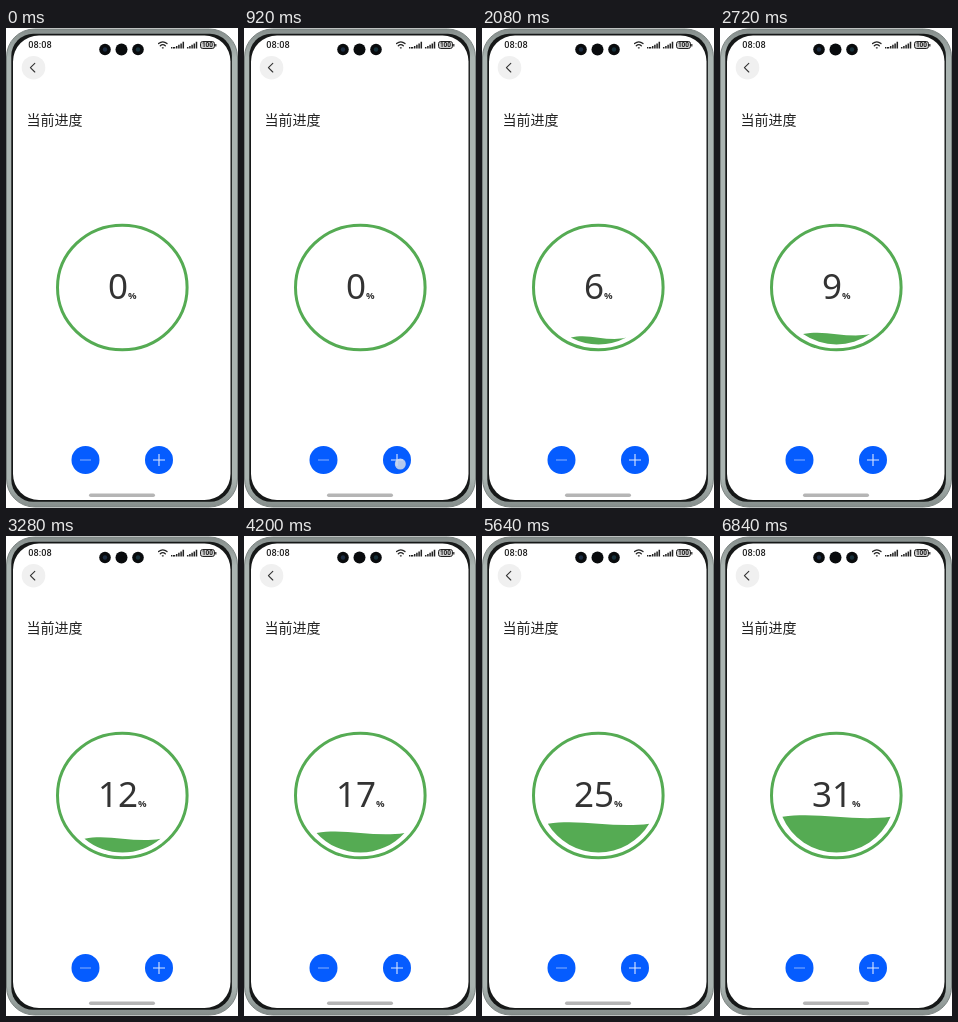
An HTML page that plays this animation: 232x480 px, repeating every 7000 ms.

```html
<!DOCTYPE html>
<html lang="zh">
<head>
<meta charset="utf-8">
<title>当前进度</title>
<style>
  html, body { margin: 0; width: 100%; height: 100%; overflow: hidden; background: #fff; }
  svg { display: block; width: 232px; height: 480px; }
  text { font-family: "Noto Sans", "Open Sans", sans-serif; }
  .title { font: 500 14px "Noto Sans CJK SC", "Noto Sans CJK", sans-serif; fill: #222; }
  .clock { font: 500 9.2px Roboto, sans-serif; fill: #222; }
  .battery { font: 700 6.5px Roboto, sans-serif; fill: #222; }
  .number { font-size: 35px; font-weight: 500; fill: #333; }
  .percent { font-size: 9.5px; font-weight: 600; }
  .line { fill: none; stroke-linecap: round; stroke-linejoin: round; }
</style>
</head>
<body>
<svg viewBox="0 0 232 480">
  <defs>
    <linearGradient id="metal" x2="0" y2="1">
      <stop offset="0" stop-color="#858d8b"/>
      <stop offset=".06" stop-color="#aab4b1"/>
      <stop offset=".94" stop-color="#aab4b1"/>
      <stop offset="1" stop-color="#858d8b"/>
    </linearGradient>
    <filter id="soft"><feGaussianBlur stdDeviation=".6"/></filter>
    <path id="bars" d="M.5 20.4V19M2.7 20.4V18M4.9 20.4V16.8M7.1 20.4V15.4M9.3 20.4V13.8" stroke="#222" stroke-width="1.5"/>
  </defs>

  <!-- phone body -->
  <rect x=".5" y="1" width="231" height="478" rx="28" fill="url(#metal)" stroke="#7b8381"/>
  <rect x="5.3" y="5.8" width="220.6" height="468" rx="22" fill="#161818" filter="url(#soft)"/>
  <rect x="7" y="7.5" width="217.5" height="464.5" rx="26" fill="#fff"/>

  <!-- status bar -->
  <text class="clock" x="22.3" y="20.3">08:08</text>
  <g fill="#090b0d">
    <circle cx="99" cy="21.5" r="5.8"/>
    <circle cx="115.5" cy="21.5" r="6"/>
    <circle cx="132" cy="21.5" r="5.8"/>
  </g>
  <circle cx="99" cy="21.5" r="2.2" fill="#1c2c40"/>
  <circle cx="132" cy="21.5" r="2.2" fill="#17303a"/>
  <g class="line" stroke="#222" stroke-width="1.3">
    <path d="M152.6 15.6Q156.8 12 161 15.6M154.3 17.7Q156.8 15.5 159.3 17.7"/>
    <path d="M156.4 19.8H157.2"/>
  </g>
  <path d="M165 19.7H168" stroke="#222" stroke-width="1.4" stroke-dasharray="1.2 .6"/>
  <use href="#bars" x="168"/>
  <use href="#bars" x="181.2"/>
  <rect x="194.5" y="13.5" width="14" height="7" rx="2.2" fill="#ccc" stroke="#222"/>
  <path d="M209.8 16V18.5" stroke="#222" stroke-width="1.2"/>
  <text class="battery" x="201.5" y="19.4" text-anchor="middle">100</text>

  <!-- header -->
  <circle cx="27.5" cy="39.7" r="11.8" fill="#f0f0f0"/>
  <path class="line" d="M28.8 35.4L24.4 39.7L28.8 44" stroke="#333" stroke-width="1.1"/>
  <text class="title" x="20.5" y="97.3">当前进度</text>

  <!-- gauge -->
  <ellipse cx="116.3" cy="259.5" rx="64.8" ry="62.3" fill="none" stroke="#55ab53" stroke-width="3"/>
  <path id="water" fill="#55ab53"/>
  <text class="number" x="116.2" y="271.2" text-anchor="middle"><tspan id="count">0</tspan><tspan class="percent">%</tspan></text>

  <!-- buttons -->
  <g fill="#055cff">
    <circle cx="79.5" cy="432" r="14"/>
    <circle cx="153" cy="432" r="14"/>
  </g>
  <path d="M74 432H85" stroke="#8ab0fc"/>
  <path d="M147 432H159M153 426V438" stroke="#dce7ff" stroke-width="1.1"/>
  <circle id="touch" cx="156.3" cy="436" r="5.5" fill="#d4dcec" fill-opacity=".85" visibility="hidden"/>
  <rect x="83" y="465.6" width="66" height="3.4" rx="1.7" fill="#b5b5b5"/>
</svg>
<script>
  const LOOP = 7000, PRESS = 80;
  // [count, time of that tap]; taps between are evenly spaced
  const PACE = [[1, 1000], [6, 2070], [7, 2280], [13, 3395], [18, 4400], [26, 5760], [31, 6680]];
  const CX = 116.5, CY = 258.8, RX = 58.5, RY = 57.7, SWELL = 5;
  const $ = id => document.getElementById(id);
  const water = $('water'), count = $('count'), touch = $('touch');

  const taps = [PACE[0][1]];
  for (let i = 1; i < PACE.length; i++) {
    const [n0, t0] = PACE[i - 1], [n1, t1] = PACE[i];
    for (let n = n0 + 1; n <= n1; n++) taps.push(t0 + (t1 - t0) * (n - n0) / (n1 - n0));
  }

  function wave(percent) {
    if (!percent) return '';
    const level = 1 - percent / 50;
    const y = CY + RY * level;
    const half = RX * Math.sqrt(1 - level * level);
    const left = CX - half, right = CX + half;
    return `M${left} ${y}C${CX - half / 3} ${y - SWELL} ${CX + half / 3} ${y + SWELL} ${right} ${y}` +
      `A${RX} ${RY} 0 0 1 ${left} ${y}Z`;
  }

  const start = performance.now();
  let shown = -1;

  function draw() {
    const t = (performance.now() - start) % LOOP;
    const n = taps.filter(tap => tap <= t).length;
    if (n !== shown) {
      shown = n;
      count.textContent = n;
      water.setAttribute('d', wave(n));
    }
    const pressed = taps.some(tap => t >= tap - PRESS && t < tap);
    touch.setAttribute('visibility', pressed ? 'visible' : 'hidden');
    requestAnimationFrame(draw);
  }
  draw();
</script>
</body>
</html>
```
